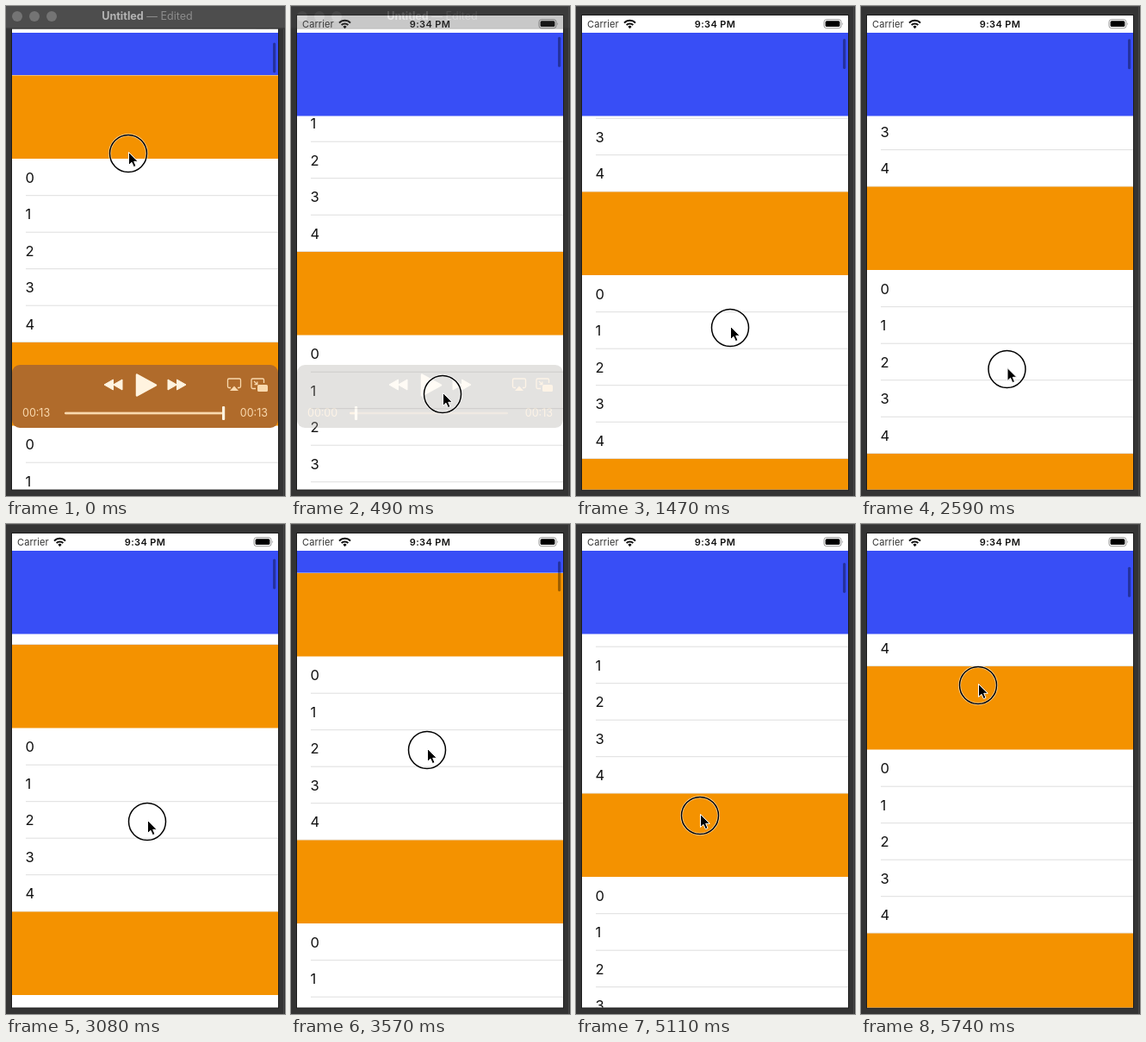
Write an HTML page that moves like this. It is 324 px wide and 568 px high and loops after 5.81 s.

```html
<!DOCTYPE html>
<html lang="en">
<head>
<meta charset="utf-8">
<title>Sticky headers</title>
<style>
  html, body { margin: 0; width: 100%; height: 100%; overflow: hidden; background: #343434; }
  svg { display: block; width: 324px; height: 568px; font-family: Inter, Roboto, sans-serif; }
</style>
</head>
<body>
<svg viewBox="0 0 324 568" xmlns="http://www.w3.org/2000/svg">
  <defs>
    <clipPath id="screen"><rect x="7" y="11" width="309" height="549.5"/></clipPath>
    <g id="skip"><path d="M0 -6L10.5 0L0 6ZM10.5 -6L21 0L10.5 6Z"/></g>
  </defs>

  <rect width="324" height="568" fill="#343434"/>
  <path d="M0 .5H324" stroke="#484848"/>
  <path d="M322.5 0V568" stroke="#484848"/>
  <rect x="6" y="10" width="311" height="551.5" fill="#1c1c1c"/>
  <rect x="7" y="11" width="309" height="549.5" fill="#fff"/>

  <g clip-path="url(#screen)">
    <g id="list"></g>
    <rect x="7" y="11" width="309" height="20" fill="#fff"/>
    <rect id="bar" x="310" width="3.2" height="35" rx="1.6" fill="#000" fill-opacity=".36"/>
    <text x="13" y="25" font-size="11" fill="#333" letter-spacing=".1">Carrier</text>
    <g fill="none" stroke="#111" stroke-width="2">
      <path d="M56 19.6A9 9 0 0 1 69 19.6"/>
      <path d="M58.6 22A5.6 5.6 0 0 1 66.4 22"/>
    </g>
    <path d="M60.4 23.9A3 3 0 0 1 64.6 23.9L62.5 26.2Z" fill="#111"/>
    <text x="161.5" y="25" font-size="11" font-weight="600" fill="#111" text-anchor="middle" letter-spacing=".35">9:34 PM</text>
    <rect x="288" y="15.7" width="20" height="10" rx="2.8" fill="none" stroke="#999"/>
    <rect x="289.6" y="17.3" width="16.8" height="6.8" rx="1.5" fill="#000"/>
    <path d="M309.4 19.2Q311 20.7 309.4 22.2Z" fill="#999"/>
  </g>

  <g id="chrome">
    <rect width="324" height="26.5" fill="#4d4d4d"/>
    <path d="M0 26H324" stroke="#303030"/>
    <g fill="#747474">
      <circle cx="13" cy="12" r="6"/><circle cx="33" cy="12" r="6"/><circle cx="53" cy="12" r="6"/>
    </g>
    <text x="164" y="16.4" font-size="12.6" text-anchor="middle" fill="#8c8c8c"><tspan font-weight="700" fill="#b4b4b4">Untitled</tspan> — Edited</text>

    <rect id="panel" x="7" y="416" width="309" height="73" rx="9"/>
    <g fill="#fff3df" stroke="#fff3df" stroke-linejoin="round">
      <path d="M152 427.5L174 439.5L152 451.5Z" stroke-width="2.5"/>
      <use href="#skip" x="188" y="439"/>
      <use href="#skip" transform="translate(135 439) scale(-1 1)"/>
    </g>
    <g fill="none" stroke="#f9d9ae" stroke-width="1.3">
      <path d="M261 442.5H259Q257.5 442.5 257.5 441V433.500Q257.500 432 259 432H271Q272.500 432 272.500 433.500V441Q272.500 442.500 271 442.500H269"/>
      <path d="M265 440.5L270 446H260Z" fill="#f9d9ae" stroke="none"/>
      <path d="M290 443.500H286.500Q285 443.500 285 442V433.500Q285 432 286.500 432H298Q299.500 432 299.500 433.500V437"/>
      <path d="M288 435L291.500 438.500M291.800 435.500V438.700H288.500"/>
      <rect x="292" y="439" width="12" height="8" rx="1.5" fill="#f9d9ae" stroke="none"/>
    </g>
    <g font-size="12.5" fill="#f9d9ae">
      <text id="clock" x="19" y="476">00:13</text>
      <text x="304" y="476" text-anchor="end">00:13</text>
    </g>
    <rect x="68" y="470.700" width="184" height="2.600" rx="1.300" fill="#f9d9ae" fill-opacity=".5"/>
    <rect id="played" x="68" y="470.700" height="2.600" rx="1.300" fill="#f9d9ae"/>
    <rect id="knob" y="464" width="3.200" height="16" rx="1" fill="#fff3df"/>
  </g>

  <g id="pointer">
    <circle r="21.500" fill="none" stroke="#fff" stroke-opacity=".65" stroke-width="3"/>
    <circle r="21.500" fill="none" stroke="#000" stroke-width="1.500"/>
    <path d="M.5 -1.500V13.500L4 10.300L6.400 15.600L9 14.500L6.700 9.300H11.300Z" fill="#000" stroke="#fff" stroke-width="1"/>
  </g>
</svg>

<script>
const LOOP = 5810, STEP = 70;
const TOP = 31, HEAD = 97, ROW = 42.5, ROWS = 5, SECTION = HEAD + ROW * ROWS;
const $ = id => document.getElementById(id);

// [time, y of the second section]
const scroll = [
  [770, 285], [840, 283], [1120, 258], [1400, 224.5], [1470, 215.5], [1610, 211],
  [2030, 209.5], [2590, 209.5], [2730, 203], [3080, 140], [3570, 57], [3710, 36],
  [3850, 20], [4200, 3], [5110, 3], [5250, -12], [5500, -85], [5740, -144.5]
];
// [time, x, y]
const pointer = [
  [770, 176, 450], [840, 176, 440], [1120, 177, 415], [1400, 178.5, 382], [1470, 179, 373],
  [1610, 178, 367], [2030, 170, 420], [2100, 169.5, 421], [2590, 169.5, 421],
  [2730, 169, 407.5], [3080, 164, 345], [3570, 158, 262], [3710, 156, 241],
  [3850, 152, 250], [4200, 144, 340], [5040, 144, 340], [5110, 144, 338],
  [5250, 143, 320], [5500, 139, 246], [5740, 136, 187]
];

// Monotone cubic interpolation of column c
function at(keys, t, c = 1) {
  const last = keys.length - 1;
  if (t <= keys[0][0]) return keys[0][c];
  if (t >= keys[last][0]) return keys[last][c];
  const slope = i => (keys[i + 1][c] - keys[i][c]) / (keys[i + 1][0] - keys[i][0]);
  const tangent = i => {
    if (i === 0 || i === last) return slope(Math.min(i, last - 1));
    const a = slope(i - 1), b = slope(i);
    return a * b <= 0 ? 0 : 2 * a * b / (a + b);
  };
  let i = 0;
  while (keys[i + 1][0] <= t) i++;
  const h = keys[i + 1][0] - keys[i][0], u = (t - keys[i][0]) / h, v = 1 - u;
  return keys[i][c] * (1 + 2 * u) * v * v + keys[i + 1][c] * u * u * (3 - 2 * u)
    + h * u * v * (tangent(i) * v - tangent(i + 1) * u);
}

function listMarkup(base) {
  let rows = "", heads = "";
  for (let s = -1; s < 3; s++) {
    const y = base + s * SECTION;
    for (let r = 0; r < ROWS; r++) {
      const ry = y + HEAD + r * ROW;
      if (ry > 562 || ry + ROW < TOP) continue;
      rows += `<text x="22.5" y="${ry + 27.2}" font-size="16.5" fill="#111">${r}</text>`
        + `<rect x="${r < ROWS - 1 ? 23 : 7}" y="${ry + ROW - 0.8}" width="309" height="1" fill="#dedede"/>`;
    }
    const pinned = y <= TOP;
    const hy = pinned ? Math.min(TOP, y + SECTION - HEAD) : y;
    heads += `<rect x="7" y="${hy}" width="309" height="${HEAD - 0.5}" fill="${pinned ? "#384ef6" : "#f49200"}"/>`;
  }
  return rows + heads;
}

function draw(t) {
  const ended = t < STEP;
  const base = ended ? 80.5 : at(scroll, t);
  $("list").innerHTML = listMarkup(base);
  $("bar").setAttribute("y", 34 + (TOP + SECTION - base) * 0.0325);

  const x = ended ? 142 : at(pointer, t, 1), y = ended ? 171 : at(pointer, t, 2);
  $("pointer").setAttribute("transform", `translate(${x} ${y})`);

  const part = ended ? 1 : t / 13000;
  $("chrome").setAttribute("opacity", ended ? 1 : Math.max(0, 1 - t / 700));
  $("panel").setAttribute("fill", ended ? "#b06b2b" : "#a6a29c");
  $("clock").textContent = ended ? "00:13" : "00:00";
  $("played").setAttribute("width", 184 * part);
  $("knob").setAttribute("x", 67 + 184 * part);
}

let shown = -1;
function tick() {
  const t = Math.floor(performance.now() % LOOP / STEP) * STEP;
  if (t !== shown) draw(shown = t);
  requestAnimationFrame(tick);
}
tick();
</script>
</body>
</html>
```
